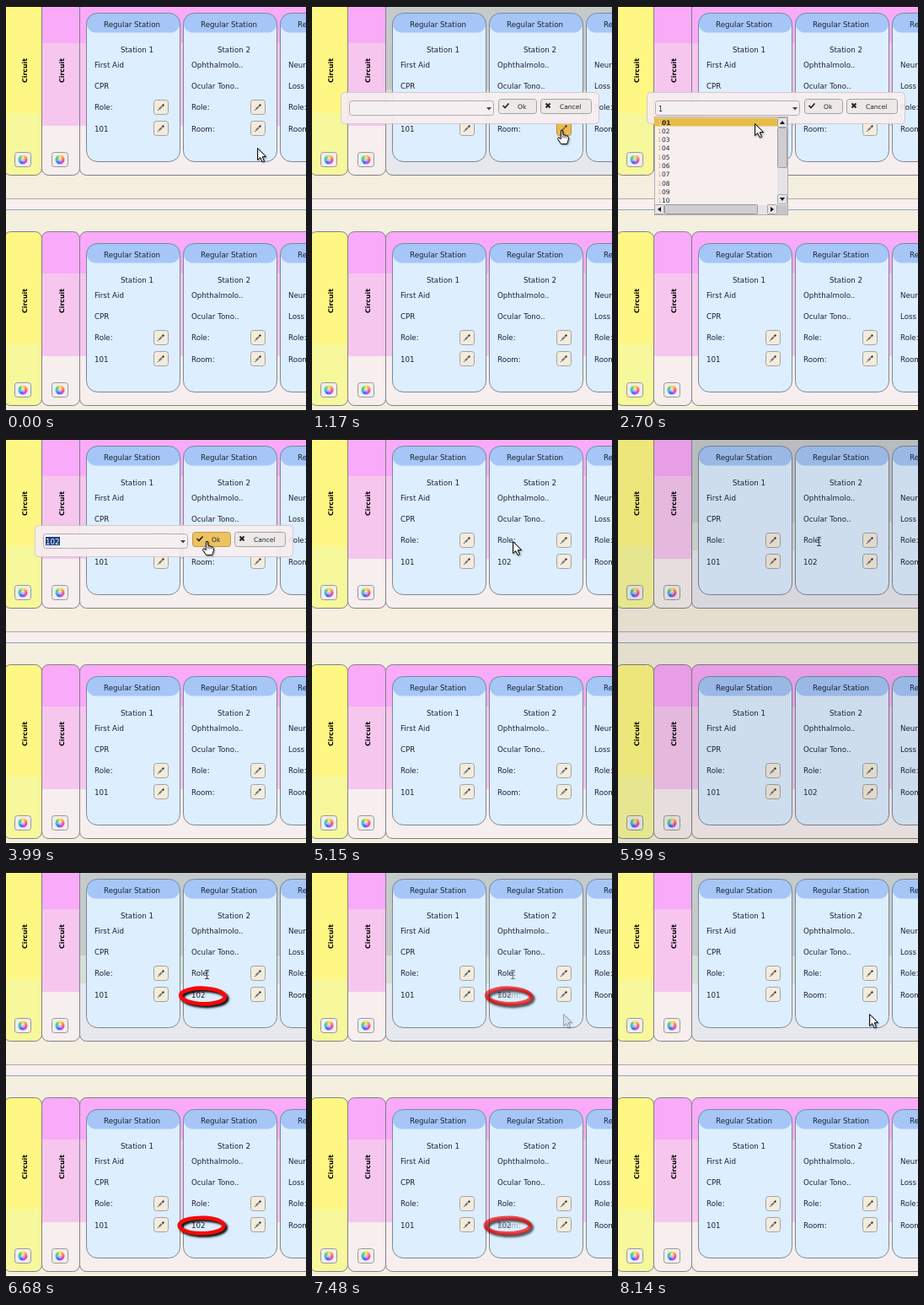
Recreate the animation shown at these times as an HTML page with a canvas. Size 356 px wide and 480 px high, loop 8.27 s.

```html
<!DOCTYPE html>
<html lang="en">
<head>
<meta charset="utf-8">
<title>Station room editor</title>
<style>
html, body { margin: 0; width: 100%; height: 100%; overflow: hidden; background: #f5efdf; }
canvas { display: block; width: 356px; height: 480px; }
</style>
</head>
<body>
<canvas id="stage" width="356" height="480"></canvas>
<script>
const ctx = document.getElementById('stage').getContext('2d');
const LOOP = 8270, ROW_GAP = 273;
const FONT = '"DejaVu Sans", sans-serif';
const INK = '#1c2230', BORDER = '#808086', EDGE = '#7b8794';
const PALE = '#f7eeee', BEIGE = '#f3ecdc', GOLD = '#e7bd4a';

const clamp = v => Math.max(0, Math.min(1, v));
const ramp = (t, a, b) => clamp((t - a) / (b - a));
const between = (t, a, b) => t >= a && t < b;

// Linear value through [time, value] pairs.
function track(t, keys) {
  let v = keys[0][1];
  for (let i = 1; i < keys.length; i++) {
    v += (keys[i][1] - keys[i - 1][1]) * ramp(t, keys[i - 1][0], keys[i][0]);
  }
  return v;
}

// Eased position through [time, x, y] points.
function path(t, keys) {
  let [, x, y] = keys[0];
  for (let i = 1; i < keys.length; i++) {
    const [t0, x0, y0] = keys[i - 1], [t1, x1, y1] = keys[i];
    let k = ramp(t, t0, t1);
    k = k * k * (3 - 2 * k);
    x += (x1 - x0) * k;
    y += (y1 - y0) * k;
  }
  return [x, y];
}

function rect(x, y, w, h, fill) {
  ctx.fillStyle = fill;
  ctx.fillRect(x, y, w, h);
}

function outline(x, y, w, h, r, color) {
  ctx.beginPath();
  ctx.roundRect(x + .5, y + .5, w - 1, h - 1, r);
  ctx.lineWidth = 1;
  ctx.strokeStyle = color;
  ctx.stroke();
}

function box(x, y, w, h, r, fill, stroke) {
  ctx.beginPath();
  ctx.roundRect(x + .5, y + .5, w - 1, h - 1, r);
  ctx.fillStyle = fill;
  ctx.fill();
  if (stroke) outline(x, y, w, h, r, stroke);
}

function line(points, color, width) {
  ctx.beginPath();
  points.forEach(([x, y]) => ctx.lineTo(x, y));
  ctx.strokeStyle = color;
  ctx.lineWidth = width;
  ctx.stroke();
}

function polygon(points, fill, stroke, width = 1) {
  ctx.beginPath();
  points.forEach(([x, y]) => ctx.lineTo(x, y));
  ctx.closePath();
  ctx.fillStyle = fill;
  ctx.fill();
  if (!stroke) return;
  ctx.strokeStyle = stroke;
  ctx.lineWidth = width;
  ctx.stroke();
}

function text(s, x, y, { size = 8.7, color = INK, align = 'left', weight = 'normal' } = {}) {
  ctx.font = `${weight} ${size}px ${FONT}`;
  ctx.textAlign = align;
  ctx.fillStyle = color;
  ctx.fillText(s, x, y);
}

function faded(alpha, draw) {
  if (alpha <= 0) return;
  ctx.save();
  ctx.globalAlpha *= alpha;
  draw();
  ctx.restore();
}

// Rounded panel filled with horizontal bands: [bottom, color].
function panel(x, w, bands, hover) {
  ctx.save();
  ctx.beginPath();
  ctx.roundRect(x + .5, -5.5, w - 1, 206, 8);
  ctx.clip();
  const paint = list => list.reduce((top, [bottom, color]) => {
    rect(x, top, w, bottom - top, color);
    return bottom;
  }, -6);
  paint(bands);
  faded(hover, () => paint([[99, '#c6caca'], [132, '#d6dfd6'], [201, '#e7e7ee']]));
  ctx.restore();
  outline(x, -6, w, 207, 8, BORDER);
}

function wheelButton(x) {
  box(x, 173, 20, 18, 3, '#eeeeec', '#98989a');
  const g = ctx.createConicGradient(-Math.PI / 2, x + 10, 182);
  ['#ffe95a', '#ff9a50', '#f0508c', '#b45af0', '#4a62f0', '#45b8ee', '#5ccf70', '#ffe95a']
    .forEach((c, i) => g.addColorStop(i / 7, c));
  ctx.beginPath();
  ctx.arc(x + 10, 182, 5.5, 0, 7);
  ctx.fillStyle = g;
  ctx.fill();
  ctx.beginPath();
  ctx.arc(x + 10, 182, 2.5, 0, 7);
  ctx.fillStyle = '#ffffff80';
  ctx.fill();
}

function pencilButton(x, y, hot) {
  box(x, y, 18, 18, 3, hot ? '#f0b94b' : BEIGE, hot ? '#b98a3a' : '#a2a2a6');
  line([[x + 6.5, y + 11.5], [x + 10, y + 8]], '#77777a', 2);
  line([[x + 10.5, y + 7.5], [x + 12.3, y + 5.7]], '#3c3e46', 2.2);
  line([[x + 5, y + 13], [x + 6, y + 12]], '#444', 1);
}

function card(x, station, first, second, room, filled, hot) {
  box(x, 8, 112, 177, 13, '#ddeeff');
  box(x, 8, 112, 24, 12, '#a5c6f7');
  outline(x, 8, 112, 177, 13, EDGE);
  text('Regular Station', x + 54.5, 25, { align: 'center' });
  text(station, x + 60.5, 55, { align: 'center' });
  text(first, x + 10, 73);
  text(second, x + 10, 98);
  text('Role:', x + 10, 123);
  faded(1 - filled, () => text('Room:', x + 10, 149));
  faded(filled, () => text(room, x + 10, 149));
  pencilButton(x + 80, 111, false);
  pencilButton(x + 80, 136, hot);
}

function row(hover, filled, hot) {
  const pink = [[44, '#f9aaf9'], [142, '#f6c6ee'], [201, PALE]];
  panel(-3, 46, [[127, '#fff783'], [201, '#f7f79c']], 0);
  panel(42, 46, pink, 0);
  panel(87, 320, pink, hover);
  for (const x of [22, 66]) {
    ctx.save();
    ctx.translate(x, 76.5);
    ctx.rotate(-Math.PI / 2);
    text('Circuit', 0, 3, { size: 7.8, color: '#000', align: 'center', weight: 'bold' });
    ctx.restore();
  }
  wheelButton(10);
  wheelButton(54);
  card(95, 'Station 1', 'First Aid', 'CPR', '101', 1, false);
  card(210, 'Station 2', 'Ophthalmolo..', 'Ocular Tono..', '102', filled, hot);
  card(325, 'Station 3', 'Neurolo..', 'Loss of..', '', 0, false);
}

function dialog(t, okHot) {
  box(34, 102, 307, 38, 4, 'rgba(248,238,240,.93)', '#d2cacc');
  box(44, 112, 172, 18, 3, '#f6eff0', '#b0aeb2');
  polygon([[207, 120], [213, 120], [210, 123.5]], '#444');
  if (between(t, 2160, 3180)) text('1', 48, 125, { size: 8 });
  if (t >= 3180) {
    const selected = t < 4850;
    if (selected) rect(47, 116, 17, 10, '#1d3f80');
    text('102', 47, 125, { color: selected ? '#fff' : INK });
  }
  box(221, 110, 46, 18, 3, okHot ? '#ecc35f' : '#ece9e6', okHot ? '#b99a55' : '#a3a3a6');
  box(271, 110, 61, 18, 3, '#ece9e6', '#a3a3a6');
  line([[226.5, 118], [229, 120.5], [233.5, 115.5]], '#222', 1.7);
  text('Ok', 244, 122, { size: 7.5 });
  line([[277.5, 115.5], [282.5, 120.5]], '#222', 2);
  line([[282.5, 115.5], [277.5, 120.5]], '#222', 2);
  text('Cancel', 294, 122, { size: 7.5 });
}

function scrollButton(x, y, turn) {
  box(x, y, 12, 12, 1, '#e4e3e6', '#a5a5ab');
  ctx.save();
  ctx.translate(x + 6, y + 6);
  ctx.rotate(turn * Math.PI / 2);
  polygon([[-3, 2], [3, 2], [0, -2]], '#111');
  ctx.restore();
}

function dropdown(active) {
  rect(43, 131, 159, 117, '#b2aeb2');
  rect(44, 132, 145, 104, PALE);
  for (let i = 0; i < 10; i++) {
    const y = 140.5 + i * 10.3, hot = i === active;
    if (hot) rect(43, y - 8, 147, 10, GOLD);
    text('1', 47, y, { size: 7.5, color: hot ? '#f3d27c' : '#e8b050' });
    text(String(i + 1).padStart(2, '0'), 52, y, { size: 7.5, weight: hot ? 'bold' : 'normal' });
  }
  rect(189, 132, 12, 104, '#e6e2e6');
  rect(44, 236, 145, 11, '#e6e2e6');
  rect(189, 236, 12, 11, '#c8c5c9');
  scrollButton(189, 132, 0);
  box(189, 144, 12, 48, 1, '#cfcdd2', '#9a9aa0');
  scrollButton(189, 223, 2);
  scrollButton(43, 235, 3);
  box(55, 235, 111, 12, 1, '#cfcdd2', '#9a9aa0');
  scrollButton(177, 235, 1);
}

function ring(x, y, tilt, done) {
  if (done <= 0) return;
  ctx.save();
  ctx.shadowColor = 'rgba(0,0,0,.95)';
  ctx.shadowBlur = 2.5;
  ctx.shadowOffsetX = ctx.shadowOffsetY = 2.5;
  ctx.lineCap = 'round';
  ctx.lineWidth = 4.6;
  ctx.strokeStyle = '#f80808';
  ctx.beginPath();
  ctx.ellipse(x, y, 26.5, 9.3, tilt, -.6, -.6 - done * Math.PI * 2, true);
  ctx.stroke();
  ctx.restore();
}

const ARROW = [[0, 0], [0, 14], [3.2, 11], [5.6, 16.3], [8, 15.2], [5.7, 10.2], [10, 10]];
const HAND = [[-1, 0], [1, 0], [1.4, 5], [6, 6], [8, 8], [7.5, 12], [6, 16], [-1, 16], [-5, 10], [-4, 8], [-1.4, 10]];

function cursor(kind, x, y) {
  ctx.save();
  ctx.translate(Math.round(x) + .5, Math.round(y) + .5);
  ctx.lineJoin = 'round';
  if (kind === 'beam') {
    line([[-2.5, -5], [2.5, -5]], '#444', 1);
    line([[0, -5], [0, 5]], '#444', 1);
    line([[-2.5, 5], [2.5, 5]], '#444', 1);
  } else {
    ctx.shadowColor = 'rgba(0,0,0,.35)';
    ctx.shadowBlur = 2;
    ctx.shadowOffsetX = ctx.shadowOffsetY = 1;
    polygon(kind === 'hand' ? HAND : ARROW, '#fff', '#111');
    ctx.shadowColor = 'transparent';
    if (kind === 'hand') for (const k of [1.4, 3.5, 5.6]) line([[k, 6], [k, 9]], '#333', .8);
  }
  ctx.restore();
}

const SAVED = 5500;
const MOVES = [
  [30, 298, 168], [240, 296, 147], [1170, 296, 147], [1760, 150, 122],
  [2520, 150, 122], [2700, 162, 139], [2850, 168, 144], [3630, 168, 144], [3990, 238, 121]
];
const HOVER = [
  [30, 0], [240, 1], [1230, 1], [1650, 0], [3180, 0], [3370, 1], [3640, 1], [3960, 0],
  [5150, 0], [5180, .25], [5340, .25], [5400, 0], [SAVED, 0], [6000, 1]
];
const DIM = [[5310, 0], [5400, .3], [SAVED, .3], [6140, 0]];

function draw(t) {
  const [x, y] = path(t, MOVES);
  const inside = (l, top, r, b) => x >= l && x <= r && y >= top && y <= b;
  const open = between(t, 670, 5150);
  const listed = between(t, 2320, 3180);
  const saved = t >= SAVED;
  const reset = ramp(t, 7180, 8140);
  const pencilHot = t < 5150 && inside(290, 137, 308, 154);
  const okHot = open && inside(221, 110, 267, 128);

  rect(0, 0, 356, 480, '#f5efdf');
  rect(0, 228, 356, 14, '#f7f0ee');
  rect(0, 228, 356, 1, '#b3a5a8');
  rect(0, 241, 356, 1, '#8fa3b8');
  row(track(t, HOVER), t < 5150 ? 0 : 1 - reset, pencilHot);
  ctx.save();
  ctx.translate(0, ROW_GAP);
  row(0, saved ? 1 - reset : 0, false);
  ctx.restore();

  if (open) dialog(t, okHot);
  if (listed) dropdown(t < 2580 ? -1 : y < 143 ? 0 : 1);
  faded(track(t, DIM), () => rect(0, 0, 356, 480, '#000'));

  const drawn = ramp(t, 6140, 6680);
  faded(1 - reset, () => {
    ring(233.5, 147, .03, drawn);
    ring(232, 419, 0, drawn);
  });

  // The pointer stays bright above the dimmed page.
  let kind = 'arrow';
  if (pencilHot || okHot) kind = 'hand';
  else if (saved || open && inside(44, 112, 215, 129)) kind = 'beam';
  faded(1 - reset, () => cursor(kind, x, y));
  faded(reset, () => cursor('arrow', 298, 168));

  rect(0, 0, 356, 1, '#000');
  rect(0, 479, 356, 1, '#000');
}

const start = performance.now();
function tick() {
  draw((performance.now() - start) % LOOP);
  requestAnimationFrame(tick);
}
tick();
</script>
</body>
</html>
```
